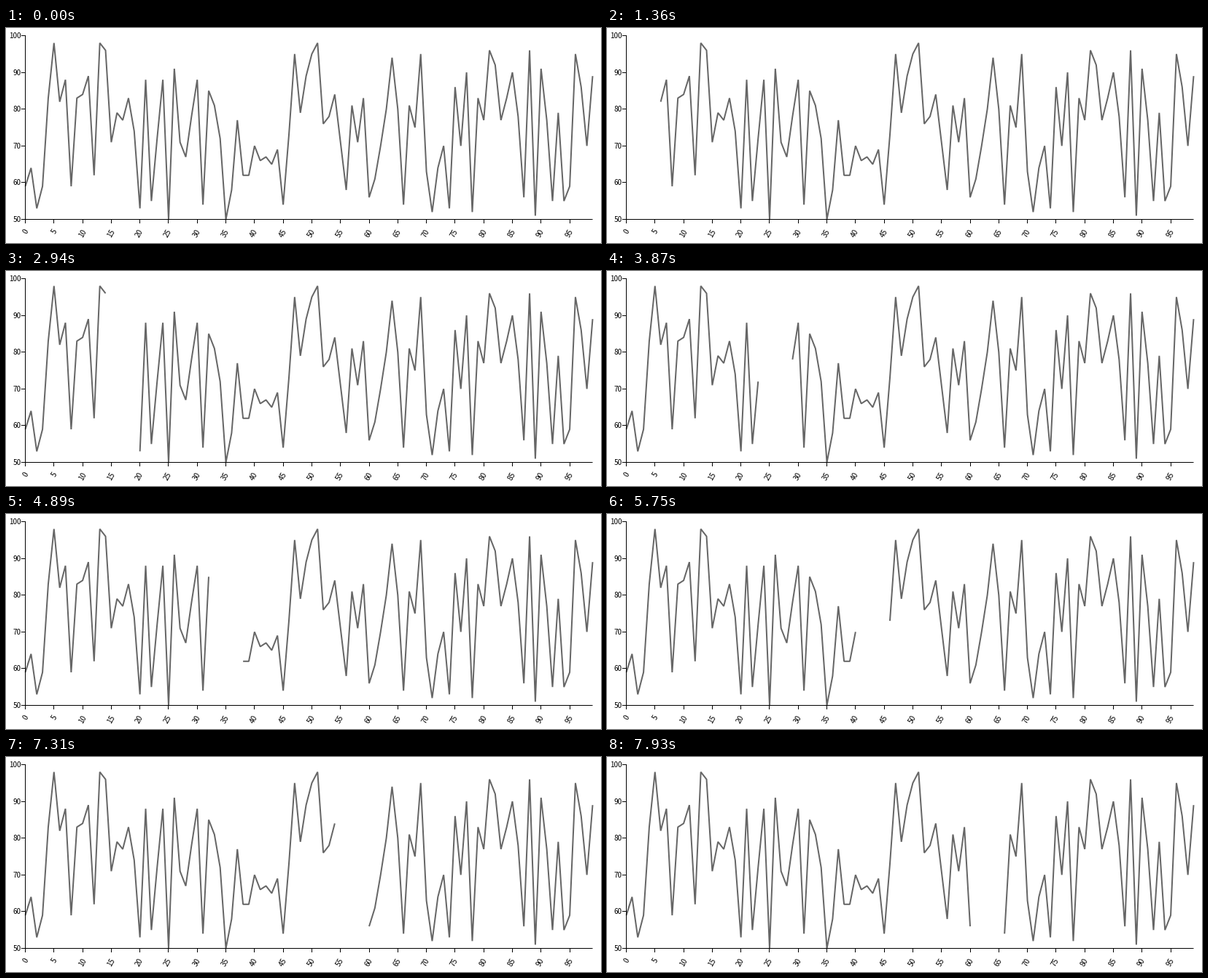
These frames come from a looping animation (816 by 296 pixels, 8 s). A matplotlib script:

```python
import matplotlib.pyplot as plt
import numpy as np
from matplotlib.animation import FuncAnimation
from matplotlib.collections import LineCollection

W, H, DPI = 816, 296, 100
LOOP, STEP = 8000, 20
PX = 72 / DPI
LEFT, RIGHT, TOP, BOTTOM = 26.5, 804.5, 10.5, 263.5

GAP = 5        # hidden points
START = 1360   # ms before the gap appears
TICK = 78.2    # ms between screen updates
PACE = 1.4     # updates per gap step

# The plotted series: irregular readings between 50 and 98.
VALUES = np.array([
    59, 64, 53, 59, 83, 98, 82, 88, 59, 83, 84, 89, 62, 98, 96, 71, 79, 77, 83, 74,
    53, 88, 55, 72, 88, 50, 91, 71, 67, 78, 88, 54, 85, 81, 72, 50, 58, 77, 62, 62,
    70, 66, 67, 65, 69, 54, 73, 95, 79, 89, 95, 98, 76, 78, 84, 71, 58, 81, 71, 83,
    56, 61, 70, 80, 94, 80, 54, 81, 75, 95, 63, 52, 64, 70, 53, 86, 70, 90, 52, 83,
    77, 96, 92, 77, 83, 90, 78, 56, 96, 51, 91, 77, 55, 79, 55, 59, 95, 86, 70, 89,
], float)


def x_pos(i):
    return LEFT + i * (RIGHT - LEFT) / (len(VALUES) - 1)


def y_pos(v):
    return BOTTOM - (v - 50) * (BOTTOM - TOP) / 50


def crisp(p):
    return np.floor(p) + 0.5


def gap_start(t):
    """Index of the last point before the gap, or None while the line is whole."""
    if t < START:
        return None
    update = (t - START) // TICK
    return int((update + 0.3) // PACE)


fig = plt.figure(figsize=(W / DPI, H / DPI), dpi=DPI, facecolor="white")
ax = fig.add_axes([0, 0, 1, 1])
ax.set(xlim=(0, W), ylim=(H, 0))
ax.axis("off")

ys = y_pos(VALUES)
line, = ax.plot(x_pos(np.arange(len(VALUES))), ys, color="#666666", lw=2 * PX,
                solid_joinstyle="bevel", solid_capstyle="butt",
                snap=False, zorder=1)

rules = [[(LEFT, TOP - 0.5), (LEFT, BOTTOM + 0.5)],
         [(LEFT, BOTTOM), (RIGHT, BOTTOM)]]
label = dict(family="Noto Sans CJK JP", size=10 * PX, color="black",
             ha="right", va="baseline")

for v in range(50, 101, 10):
    y = crisp(y_pos(v))
    rules.append([(LEFT - 5.5, y), (LEFT, y)])
    ax.text(20.5, y + 3.7, str(v), **label)

for i in range(0, 100, 5):
    x = crisp(x_pos(i))
    rules.append([(x, BOTTOM), (x, BOTTOM + 5.5)])
    ax.text(x + 5, BOTTOM + 16, str(i), rotation=60,
            rotation_mode="anchor", **label)

axes_lines = LineCollection(rules, colors="black", linewidths=PX, zorder=2)
axes_lines.set_snap(False)
ax.add_collection(axes_lines, autolim=False)


def draw(frame):
    last = gap_start(frame * STEP + STEP / 2)
    shown = ys.copy()
    if last is not None:
        shown[last + 1:last + 1 + GAP] = np.nan
    line.set_ydata(shown)
    return line,


anim = FuncAnimation(fig, draw, frames=LOOP // STEP, interval=STEP,
                     repeat=True, repeat_delay=0, blit=False)
plt.show()
```
